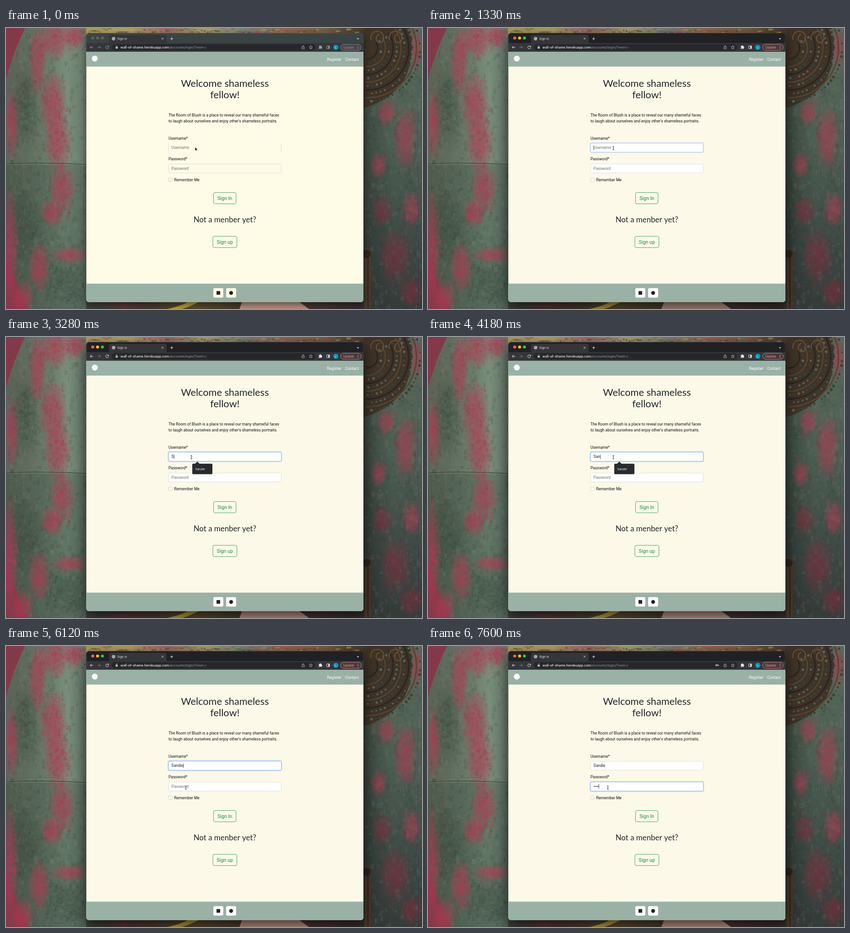
An HTML page with a canvas for the animation above (8 s loop, 909x616 px).

```html
<!DOCTYPE html>
<html lang="en">
<head>
<meta charset="utf-8">
<title>Sign in</title>
<style>
html, body { margin: 0; width: 100%; height: 100%; overflow: hidden; background: #4f5f52; }
canvas { display: block; width: 909px; height: 616px; }
</style>
</head>
<body>
<canvas id="stage"></canvas>
<script>
const W = 909, H = 616, LOOP = 8000;
const dpr = Math.max(1, window.devicePixelRatio || 1);
const ROBOTO = 'Roboto, sans-serif';
const INTER = 'Inter, sans-serif';
const LATO = 'Lato, sans-serif';
const NAME = 'Sandie';
const NAME_KEYS = [3280, 3580, 4180, 4630, 5080, 5230];
const PASS_KEYS = [6850, 7150, 7300, 7600];

function setup(canvas) {
  canvas.width = W * dpr;
  canvas.height = H * dpr;
  const c = canvas.getContext('2d');
  c.scale(dpr, dpr);
  return c;
}

const stage = document.getElementById('stage');
const view = setup(stage);
let g = view;

function rect(x, y, w, h, color) {
  g.fillStyle = color;
  g.fillRect(x, y, w, h);
}

function box(x, y, w, h, r, fill, stroke, lw = 0.7) {
  g.beginPath();
  g.roundRect(x, y, w, h, r);
  if (fill) { g.fillStyle = fill; g.fill(); }
  if (stroke) { g.strokeStyle = stroke; g.lineWidth = lw; g.stroke(); }
}

function disc(x, y, r, color) {
  g.beginPath();
  g.arc(x, y, r, 0, Math.PI * 2);
  g.fillStyle = color;
  g.fill();
}

function path(d, x, y, stroke, lw = 1, fill) {
  g.save();
  g.translate(x, y);
  const p = new Path2D(d);
  if (fill) { g.fillStyle = fill; g.fill(p); }
  if (stroke) { g.strokeStyle = stroke; g.lineWidth = lw; g.stroke(p); }
  g.restore();
}

function text(s, x, y, size, color, font = ROBOTO, align = 'left', weight = 400) {
  g.font = `${weight} ${size}px ${font}`;
  g.fillStyle = color;
  g.textAlign = align;
  g.fillText(s, x, y);
  return g.measureText(s).width;
}

function random(seed) {
  return () => {
    seed = (seed + 0x6d2b79f5) | 0;
    let v = Math.imul(seed ^ (seed >>> 15), 1 | seed);
    v = (v + Math.imul(v ^ (v >>> 7), 61 | v)) ^ v;
    return ((v ^ (v >>> 14)) >>> 0) / 4294967296;
  };
}

function gradient(x0, y0, x1, y1, colors) {
  const q = g.createLinearGradient(x0, y0, x1, y1);
  colors.forEach((c, i) => q.addColorStop(i / (colors.length - 1), c));
  return q;
}

// Worn paint: a soft stain broken up by small flecks
function stain(rnd, [x, y, w, h], rgb, alpha = 0.6) {
  g.save();
  g.translate(x, y);
  g.scale(w / 2, h / 2);
  const q = g.createRadialGradient(0, 0, 0, 0, 0, 1.15);
  q.addColorStop(0, `rgba(${rgb},${alpha})`);
  q.addColorStop(0.5, `rgba(${rgb},${alpha * 0.7})`);
  q.addColorStop(1, `rgba(${rgb},0)`);
  g.fillStyle = q;
  g.fillRect(-1.15, -1.15, 2.3, 2.3);
  g.restore();
  for (let i = w * h / 30; i > 0; i--) {
    const px = x + (rnd() + rnd() - 1) * w * 0.6;
    const py = y + (rnd() + rnd() - 1) * h * 0.6;
    rect(px, py, 1 + rnd() * 4, 1 + rnd() * 6, `rgba(${rgb},${rnd() * alpha * 0.8})`);
  }
}

function grain(rnd, x, w, n) {
  for (let i = 0; i < n; i++)
    rect(x + rnd() * w, rnd() * H, 2 + rnd() * 7, 2 + rnd() * 12,
      rnd() < 0.5 ? 'rgba(40,52,44,.12)' : 'rgba(140,150,128,.09)');
}

function paintWall() {
  const rnd = random(17);
  const red = '178,58,82', darkRed = '128,46,60', shade = '52,68,56';

  // left side
  rect(0, 0, 180, H, '#83394a');
  g.save();
  g.beginPath();
  g.arc(675, 300, 701, 0, Math.PI * 2);
  g.clip();
  rect(0, 0, 180, H, gradient(0, 0, 178, 0, ['#5b6354', '#5f6c5d', '#687a69', '#788d7a', '#65786a']));
  rect(0, 299, 180, H - 299, gradient(0, 299, 0, H, ['rgba(42,62,52,.22)', 'rgba(42,62,52,.38)']));
  for (const spot of [[42, 170, 60, 180], [40, 430, 80, 160], [130, 560, 90, 110]])
    stain(rnd, spot, shade, 0.3);
  grain(rnd, 0, 178, 900);
  g.restore();
  for (const spot of [
    [68, 70, 36, 140], [106, 24, 66, 80], [150, 16, 46, 56], [102, 165, 56, 130], [112, 250, 54, 120],
    [12, 210, 28, 140], [122, 350, 52, 100], [100, 405, 46, 60], [8, 480, 32, 240], [72, 525, 44, 100],
    [140, 497, 80, 34], [36, 590, 44, 70]
  ]) stain(rnd, spot, red);
  path('M0 0Q60 -4 175 1', 0, 298, '#354038', 1.2);
  path('M0 2Q60 -2 175 3', 0, 298, 'rgba(160,175,155,.35)', 0.8);

  // right side
  rect(775, 0, 134, H, gradient(0, 0, 0, H, ['#566759', '#526456', '#4d5f53', '#45534b', '#3c4743', '#343b39']));
  rect(775, 0, 70, H, gradient(775, 0, 845, 0, ['rgba(30,36,32,.45)', 'rgba(30,36,32,0)']));
  grain(rnd, 780, 129, 700);
  for (const spot of [[872, 240, 48, 130], [830, 185, 38, 56], [814, 300, 34, 54], [895, 45, 30, 90], [886, 395, 40, 70]])
    stain(rnd, spot, red, 0.52);
  for (const spot of [[850, 500, 64, 110], [822, 400, 40, 64], [885, 580, 48, 64]])
    stain(rnd, spot, darkRed, 0.52);

  // carved wood
  path('M781 0H882Q898 60 868 118Q836 160 781 176Z', 0, 0, null, 0, '#3f3327');
  for (let ring = 0; ring < 6; ring++) {
    const r = 24 + ring * 17;
    g.beginPath();
    g.arc(788, 44, r, -0.6, 1.6);
    g.strokeStyle = ring % 2 ? '#57442f' : '#2b241e';
    g.lineWidth = 3;
    g.stroke();
    for (let a = -0.5; a < 1.55; a += 9 / r)
      disc(788 + Math.cos(a) * (r + 8), 44 + Math.sin(a) * (r + 8), 1.6 + rnd() * 1.6, rnd() < 0.5 ? '#35423a' : '#52655a');
  }
  for (const x of [812, 852]) path('M-14 8A14 14 0 1 1 8 14A8 8 0 1 1 4 -4', x, 18, '#6d5537', 2);
  path('M783 480L799 486L797 616H783Z', 0, 0, null, 0, '#4b3929');
  rect(790, 490, 2, 126, '#2a231e');
  disc(788, 495, 9, '#2c2520');

  // slivers above and below the window
  rect(175, 0, 606, 14, gradient(175, 0, 781, 0, ['#a89a58', '#b3a062', '#a06a62', '#a8a06c', '#7c8070', '#94654f', '#75603f', '#45372b']));
  for (let x = 180; x < 775; x += 6)
    rect(x, rnd() * 9, 3 + rnd() * 8, 1 + rnd() * 4, `rgba(${['190,170,90', '165,72,92', '90,110,96', '80,62,46'][Math.floor(rnd() * 4)]},.5)`);
  rect(175, 598, 606, 18, gradient(175, 0, 781, 0, ['#3b4038', '#45372d', '#5a4a2b', '#433529', '#4a3230', '#322b29']));
  path('M352 616Q385 609 400 599H424Q400 612 384 616Z', 0, 0, null, 0, '#b99a35');
  path('M510 616L516 600H640L662 616Z', 0, 0, null, 0, '#b98f80');
  stain(rnd, [260, 609, 100, 14], darkRed, 0.4);
}

const wall = document.createElement('canvas');
g = setup(wall);
paintWall();
g = view;

function drawShadow(active) {
  g.save();
  g.shadowColor = active ? 'rgba(0,0,0,.68)' : 'rgba(0,0,0,.5)';
  g.shadowBlur = (active ? 30 : 16) * dpr;
  g.shadowOffsetY = (active ? 9 : 5) * dpr;
  box(175.5, 11, 605.5, 590, 6, '#222');
  g.restore();
}

function drawChrome(t) {
  const lit = t >= 740, active = t >= 890;
  const ink = active ? '#e8eaed' : '#9a9fa1';
  const bar = '#35363a';
  rect(175, 11, 607, 23, active ? '#202124' : '#3b4444');
  rect(175, 33, 607, 19, bar);
  ['#ff5f57', '#febc2e', '#28c840'].forEach((c, i) => disc(189.5 + i * 10.6, 22, 3.3, lit ? c : '#5b6163'));

  box(225, 15, 126, 20, [4, 4, 0, 0], bar);
  disc(235, 23.3, 3.6, '#d4d7da');
  path('M-3.2 -1Q0 1 0.4 -3M-2 2.7Q0 0 3.4 1', 235, 23.3, bar, 0.9);
  text('Sign in', 243, 25.8, 6.7, '#e8eaed', INTER);
  path('M-2 -2L2 2M2 -2L-2 2', 342, 23.3, '#dfe1e4', 0.9);
  path('M-3 0H3M0 -3V3', 362, 23.5, '#dfe1e4', 1.1);
  path('M-2 -1L0 1L2 -1', 769, 23.5, '#dfe1e4', 1.1);

  path('M3.5 0H-3M0 -3L-3 0L0 3', 187, 42.3, ink, 1);
  path('M-3.5 0H3M0 -3L3 0L0 3', 203.5, 42.3, '#7d8083', 1);
  path('M2.4 -1.9A3.1 3.1 0 1 0 3.1 0.6M3.2 -3.4V-1H0.8', 221, 42.3, ink, 1);

  box(231, 35.5, 445, 13.5, 6.7, '#25272a');
  rect(239.6, 41.4, 4.6, 3.7, '#c4c7ca');
  path('M-1.4 0V-1.4A1.4 1.4 0 0 1 1.4 -1.4V0', 241.9, 41.5, '#c4c7ca', 0.8);
  const w = text('wall-of-shame.herokuapp.com', 250, 44.8, 7.2, '#f1f3f4', INTER, 'left', 500);
  text('/accounts/login/?next=/', 250 + w, 44.8, 7.2, '#9aa0a6', INTER);

  if (t >= PASS_KEYS[0]) {
    path('M-0.6 0H4M2.8 0V1.8', 632, 42, '#dfe1e4', 1.2);
    g.beginPath();
    g.arc(630.3, 42, 1.7, 0, Math.PI * 2);
    g.strokeStyle = '#dfe1e4';
    g.lineWidth = 1.1;
    g.stroke();
  }
  path('M-1.2 -1H-2.7V3.4H2.7V-1H1.2M0 1.3V-3.6M-1.5 -2.2L0 -3.7L1.5 -2.2', 649.3, 42.2, '#c4c7ca', 0.8);
  path('M0 -3.7L1 -1.2L3.6 -1L1.6 0.8L2.3 3.4L0 2L-2.3 3.4L-1.6 0.8L-3.6 -1L-1 -1.2Z', 666, 42.3, '#c4c7ca', 0.8);
  path('M-3.4 -2.4H-1.3A1.2 1.2 0 1 1 1 -2.4H2.8V-.4A1.2 1.2 0 1 1 2.8 2V3.7H.8A1.2 1.2 0 0 0 -1.5 3.7H-3.4V1.8A1.2 1.2 0 0 0 -3.4 -.5Z', 687, 42, null, 0, ink);
  box(700.8, 39.2, 6.2, 6, 0.5, null, ink, 1);
  rect(704.3, 39.2, 2.7, 6, ink);
  disc(720.7, 42.3, 5.6, '#0798bf');
  text('L', 720.7, 44.6, 6.2, '#e9f7fb', INTER, 'center');
  box(731, 35.6, 45.5, 13.4, 6.7, active ? '#4a3a3c' : '#46464a', active ? '#d28c87' : '#93908b', 0.9);
  text('Update', 737, 44.8, 6.9, active ? '#f09a93' : '#95908c', INTER);
  for (const y of [-2.6, 0, 2.6]) disc(769.3, 42.3 + y, 0.8, active ? '#f0b0aa' : '#b0aeac');
}

function button(x, y, w, h, label) {
  box(x, y, w, h, 3.4, null, '#35976a', 0.9);
  text(label, x + w / 2, y + h / 2 + 3.7, 10.7, '#198754', ROBOTO, 'center');
}

function drawPage(lit) {
  const cream = lit ? '#fcf9e8' : '#fefbe7', sage = '#9ab1a6';
  rect(175, 52, 607, 550, cream);
  rect(175, 52, 607, 32.6, sage);
  rect(175, 560.4, 607, 41, sage);
  disc(194, 67, 6.5, '#fff');
  text('Register', 701.5, 71.5, 8.6, '#fff');
  text('Contact', 741, 71.5, 8.6, '#fff');

  const ink = '#212529';
  text('Welcome shameless', 478.3, 129.3, 21.7, ink, LATO, 'center');
  text('fellow!', 478.3, 154.3, 21.7, ink, LATO, 'center');
  text('The Room of Blush is a place to reveal our many shameful faces', 355, 194, 8.5, '#111');
  text('to laugh about ourselves and enjoy other\'s shameless portraits.', 355, 206.6, 8.5, '#111');
  text('Username*', 355, 244.7, 8.5, '#111');
  text('Password*', 355, 290.3, 8.5, '#111');
  box(355.4, 328.9, 7.8, 7.8, 2, lit ? '#fff' : cream, '#b9bbb6', 0.7);
  text('Remember Me', 367.5, 336, 8.5, '#111');
  button(453.5, 360.6, 49.2, 24.8, 'Sign In');
  text('Not a menber yet?', 478.3, 426.4, 16.9, ink, LATO, 'center');
  button(452, 456.6, 52.6, 24.8, 'Sign up');

  const tile = lit ? '#fff' : cream;
  box(453, 570.3, 21.8, 20.8, 3, tile);
  box(481, 570.3, 21.8, 20.8, 3, tile);
  rect(460, 576.7, 8, 8, '#1f2427');
  disc(491.9, 580.7, 4.2, '#1f2427');
}

function field(y, focus, lit) {
  if (focus) {
    g.globalAlpha = focus;
    box(353.3, y - 1.8, 249.9, 23.6, 4.4, '#bdd5f8');
    g.globalAlpha = 1;
  }
  box(355.2, y + 0.2, 246.3, 19.6, 3, lit ? '#fff' : '#fefbe7', focus ? '#86b7fe' : '#cfd4d3', 0.7);
}

function caret(x, y) {
  rect(x, y, 0.7, 10, '#111');
}

function popup(x, y, w, h) {
  path('M-5 0.2L0 -4.8L5 0.2Z', 418, y, null, 0, '#292a2d');
  box(x, y, w, h, 1.8, '#292a2d');
}

function drawForm(t) {
  const lit = t >= 740;
  const hint = '#6b7073';
  const focusName = t < 1330 ? 0 : t < 1480 ? 0.5 : t < 6260 ? 1 : t < 6410 ? 0.5 : 0;
  const focusPass = t < 6260 ? 0 : t < 6410 ? 0.5 : 1;
  const typed = NAME.slice(0, NAME_KEYS.filter(k => t >= k).length);
  const dots = PASS_KEYS.filter(k => t >= k).length;

  field(252.4, focusName, lit);
  if (!lit) rect(357, 251.6, 243, 21.4, '#fefbe7');
  const nameWidth = typed ? text(typed, 361.6, 265.4, 8.5, '#1c1f22') : 0;
  if (!typed) text('Username', 361.6, 265.4, 8.5, hint);
  const blink = (t >= 1930 && t < 2380) || (t >= 2980 && t < 3280);
  if (t >= 1330 && t < 6260 && !blink) caret(361.8 + nameWidth, 257.5);

  field(298, focusPass, lit);
  if (!dots) text('Password', 361.6, 311, 8.5, hint);
  for (let i = 0; i < dots; i++) disc(363.3 + i * 2.8, 307.7, 1.05, '#1c1f22');
  if (t >= 6260) caret(361.8 + dots * 2.85, 303);
}

function drawPopups(t) {
  if (t >= 1480 && t < 3280) {
    popup(407, 277.8, 95, 46.7);
    rect(407, 301, 95, 0.6, '#3f4145');
    text('loremavis@example.com', 413.5, 291.6, 6.5, '#f1f3f4', INTER);
    disc(417.6, 313, 3.6, '#9a9da1');
    text('Manage...', 428, 315.4, 6.6, '#9aa0a6', INTER);
  } else if (t >= 3280 && t < 5230) {
    popup(407, 277.8, 44, 23);
    text(NAME, 413.5, 291.6, 6.5, '#f1f3f4', INTER);
  } else if (t >= 6410 && t < PASS_KEYS[0]) {
    popup(407, 323, 177, 23.3);
    disc(417.6, 334.6, 4.1, '#4285f4');
    text('Use passwords saved in your Plinzo Account', 428, 337, 6.6, '#9aa0a6', INTER);
  }
}

function arrow(x, y) {
  path('M0 0V8.2L1.9 6.5L3.1 9.2L4.4 8.6L3.2 6H5.8Z', x, y, '#fff', 0.8, '#000');
}

function beam(x, y) {
  const d = 'M-1.5 -4Q0 -4 0 -3V3Q0 4 -1.5 4M1.5 -4Q0 -4 0 -3M0 3Q0 4 1.5 4';
  path(d, x, y, 'rgba(255,255,255,.8)', 1.8);
  path(d, x, y, '#111', 0.9);
}

function drawPointer(t) {
  if (t < 450) return arrow(413, 261);
  if (t < 590) return arrow(408.5, 261.6);
  if (t < 890) return arrow(404.6, 262.6);
  const k = Math.max(0, Math.min(5, Math.floor((t - 5530) / 146.6) + 1)) / 5;
  const e = k * k * (3 - 2 * k);
  const x = 405 - 12 * e, y = 263.5 + 47 * e;
  if (y > 273 && y < 298) arrow(x - 1, y - 3);
  else beam(x, y);
}

function draw(t) {
  g.drawImage(wall, 0, 0, W, H);
  drawShadow(t >= 890);
  g.save();
  g.beginPath();
  g.roundRect(175.5, 11, 605.5, 590, 6);
  g.clip();
  drawPage(t >= 740);
  drawChrome(t);
  drawForm(t);
  g.restore();
  box(175.8, 11.3, 604.9, 589.4, 6, null, 'rgba(190,200,195,.22)', 0.6);
  drawPopups(t);
  drawPointer(t);
}

const start = performance.now();
function tick() {
  draw((performance.now() - start) % LOOP);
  requestAnimationFrame(tick);
}
tick();
</script>
</body>
</html>
```
